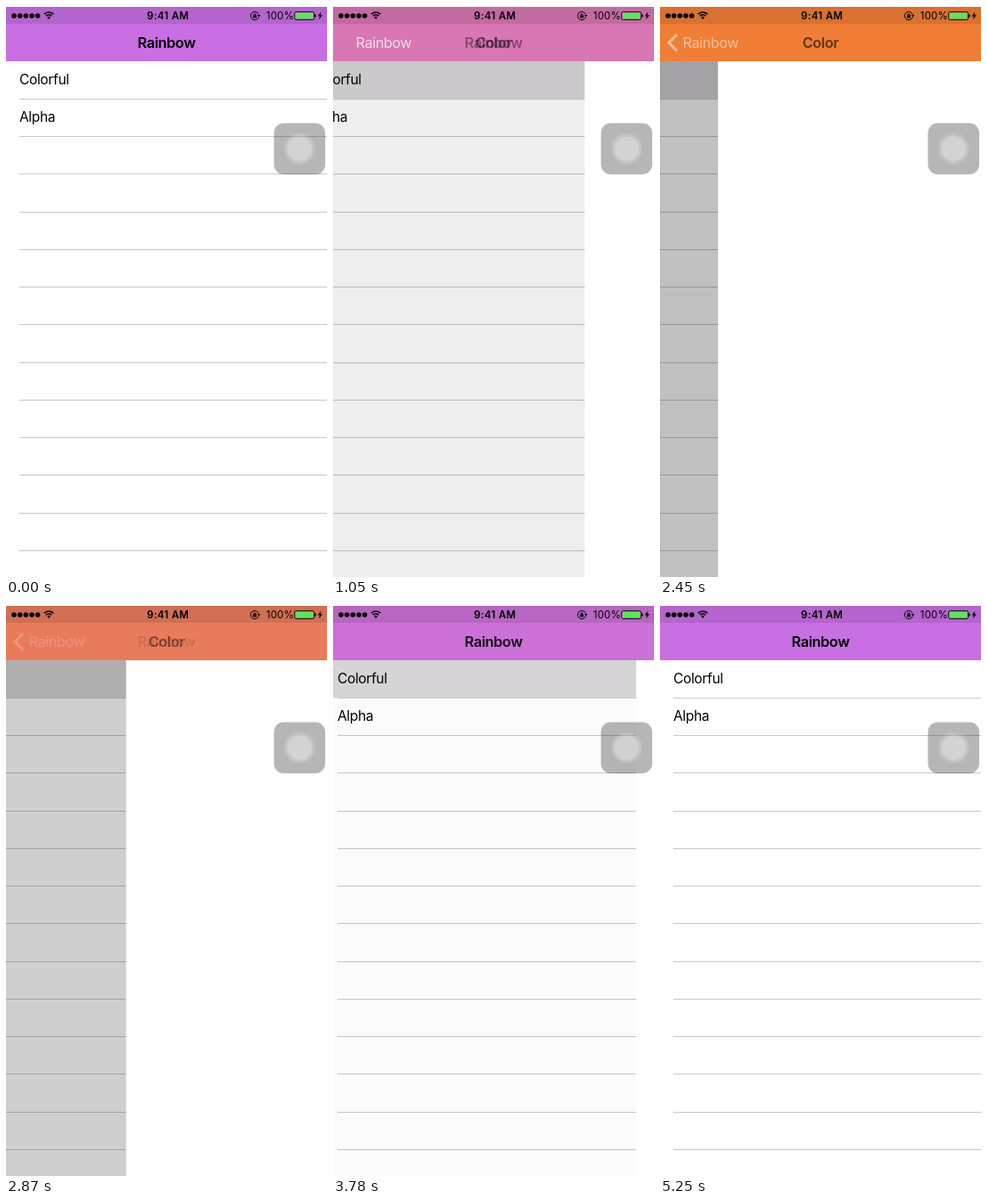
These frames come from a looping animation (360x641 px, 5.32 s). An HTML page with a canvas:

```html
<!DOCTYPE html>
<html lang="en">
<head>
<meta charset="utf-8">
<title>Navigation bar transition</title>
<style>
html, body { margin: 0; width: 100%; height: 100%; overflow: hidden; background: #fff; }
canvas { display: block; width: 360px; height: 641px; }
</style>
</head>
<body>
<canvas id="stage"></canvas>
<script>
const W = 360, H = 641, LOOP = 5320, STEP = 70;
const BAR_TOP = 1, STATUS_END = 20, BAR_END = 62, ROW = 42.24;
const PUSH = 900, PUSH_TIME = 500, DRAG = 2150, RELEASE = 3640, SETTLED = 3900;
const FONT = 'Inter, Roboto, sans-serif';

const canvas = document.getElementById('stage');
const ctx = canvas.getContext('2d');
const dpr = window.devicePixelRatio || 1;
canvas.width = W * dpr;
canvas.height = H * dpr;

const clamp = v => Math.max(0, Math.min(1, v));
const smooth = v => { v = clamp(v); return v * v * (3 - 2 * v); };

// Piecewise linear value through [position, value] pairs.
function track(x, keys) {
  if (x <= keys[0][0]) return keys[0][1];
  for (let i = 1; i < keys.length; i++) {
    const [a, from] = keys[i - 1], [b, to] = keys[i];
    if (x <= b) return from + (to - from) * (x - a) / (b - a);
  }
  return keys[keys.length - 1][1];
}

function barColor(mix) {
  const r = track(mix, [[0, 200], [.27, 217], [.5, 226], [1, 240]]);
  const g = track(mix, [[0, 111], [.27, 118], [1, 126]]);
  const b = track(mix, [[0, 228], [.27, 180], [.5, 139], [1, 52]]);
  return `rgb(${Math.round(r)},${Math.round(g)},${Math.round(b)})`;
}

// Share of the stage the list still occupies: 1 is list only, 0 is detail only.
function listShare(t) {
  if (t < DRAG) return 1 - smooth((t - PUSH) / PUSH_TIME);
  if (t < RELEASE) {
    return track(t, [[DRAG, 0], [2450, 65], [3360, 216], [RELEASE, 266]]) / W;
  }
  const u = clamp((t - RELEASE) / (SETTLED - RELEASE));
  return 1 - (1 - 266 / W) * (1 - u) ** 2;
}

function barState(t, share) {
  if (t < DRAG) {
    return {
      mix: track(t, [[PUSH, 0], [1050, .27], [1400, 1]]),
      home: track(t, [[PUSH, 1], [1050, .38], [1260, 0]]),
      detail: track(t, [[PUSH, 0], [1050, .55], [1330, 1]]),
      back: track(t, [[PUSH, 0], [1050, .75], [1260, 1]]),
      arrow: track(t, [[1050, 0], [1400, 1]])
    };
  }
  const back = track(share, [[0, 1], [.18, .5], [.5, 0]]);
  return {
    mix: track(share, [[0, 1], [.18, .99], [.6, .5], [1, 0]]),
    home: track(share, [[.18, 0], [.6, .25], [1, 1]]),
    detail: track(share, [[0, 1], [.18, .6], [.6, .25], [1, 0]]),
    back,
    arrow: back
  };
}

function rect(x, y, w, h, color) {
  ctx.fillStyle = color;
  ctx.fillRect(x, y, w, h);
}

function disc(x, y, r, color) {
  ctx.fillStyle = color;
  ctx.beginPath();
  ctx.arc(x, y, r, 0, 7);
  ctx.fill();
}

function box(x, y, w, h, r) {
  ctx.beginPath();
  ctx.roundRect(x, y, w, h, r);
}

function line(points, color, width) {
  ctx.strokeStyle = color;
  ctx.lineWidth = width;
  ctx.beginPath();
  points.forEach(([x, y]) => ctx.lineTo(x, y));
  ctx.stroke();
}

function text(str, x, y, size, { weight = 400, color = '#000', align = 'left', gap = -.4, alpha = 1 } = {}) {
  if (alpha <= 0) return;
  ctx.globalAlpha = alpha;
  ctx.font = `${weight} ${size}px ${FONT}`;
  ctx.letterSpacing = gap + 'px';
  ctx.textAlign = align;
  ctx.fillStyle = color;
  ctx.fillText(str, x, y);
  ctx.globalAlpha = 1;
}

function drawList(t, share) {
  const edge = W * share, gone = 1 - share;
  if (edge <= 0) return;
  ctx.save();
  ctx.beginPath();
  ctx.rect(0, BAR_END, edge, H - BAR_END);
  ctx.clip();
  ctx.translate(-W * gone / 2, 0);
  rect(0, BAR_END, W, H, '#fff');
  for (let k = 1; k <= 13; k++) {
    rect(15, Math.round(61.7 + ROW * k), W, 1, '#c8c7ca');
  }
  const lit = t < PUSH ? 0 : 1 - clamp((t - 3990) / 260);
  if (lit) rect(0, BAR_END, W, ROW, `rgba(217,215,217,${lit})`);
  text('Colorful', 15, 88, 15.5, { gap: -.35 });
  text('Alpha', 15, 130.3, 15.5, { gap: -.35 });
  rect(0, BAR_END, W, H, `rgba(0,0,0,${.3 * gone})`);
  ctx.restore();
}

function drawStatus() {
  for (let i = 0; i < 5; i++) disc(9 + 6.65 * i, 11, 2.8, '#000');

  ctx.strokeStyle = '#000';
  ctx.lineWidth = 1.6;
  for (const r of [4.3, 7.2]) {
    ctx.beginPath();
    ctx.arc(48, 14.2, r, -Math.PI * .76, -Math.PI * .24);
    ctx.stroke();
  }
  ctx.fillStyle = '#000';
  ctx.beginPath();
  ctx.moveTo(48, 15);
  ctx.arc(48, 14.4, 2.4, -Math.PI * .78, -Math.PI * .22);
  ctx.fill();

  text('9:41 AM', 181.7, 14.7, 11.5, { weight: 600, align: 'center', gap: .3 });

  // Rotation lock
  ctx.lineWidth = 1;
  ctx.beginPath();
  ctx.arc(279, 11, 4.6, .35, 5.9);
  ctx.stroke();
  rect(277, 10.4, 4, 2.9, '#000');
  ctx.beginPath();
  ctx.arc(279, 10.2, 1.3, Math.PI, 0);
  ctx.stroke();
  ctx.beginPath();
  ctx.moveTo(281.8, 10);
  ctx.lineTo(285.4, 10);
  ctx.lineTo(283.6, 12.4);
  ctx.fill();

  text('100%', 291.8, 14.7, 11.5, { gap: .15 });

  // Battery and charging bolt
  ctx.lineWidth = .9;
  box(323.6, 6.6, 22, 8.8, 1.8);
  ctx.stroke();
  rect(324.7, 7.7, 19.8, 6.6, '#5fe35c');
  box(346.2, 9.3, 1.4, 3.4, .7);
  ctx.fillStyle = '#000';
  ctx.fill();
  ctx.beginPath();
  [[353.4, 6.6], [349.6, 11.4], [351.9, 11.4], [351, 15.2], [355, 10.2], [352.6, 10.2]]
    .forEach(([x, y]) => ctx.lineTo(x, y));
  ctx.fill();
}

function drawBar(bar) {
  rect(0, BAR_TOP, W, BAR_END - BAR_TOP, barColor(bar.mix));
  rect(0, BAR_TOP, W, STATUS_END - BAR_TOP, 'rgba(0,0,0,.1)');
  const title = { weight: 600, align: 'center' };
  text('Rainbow', 180, 47, 16.3, { ...title, alpha: bar.home });
  text('Color', 180, 47, 16.3, { ...title, alpha: bar.detail });
  text('Rainbow', 25.5, 47, 16.2, { color: '#fff', alpha: bar.back });
  ctx.globalAlpha = bar.arrow;
  line([[19, 32], [10, 41.2], [19, 50.4]], '#fff', 3);
  ctx.globalAlpha = 1;
  drawStatus();
}

function drawTouchButton() {
  box(300.5, 131.5, 57.5, 57.5, 11);
  ctx.fillStyle = 'rgba(4,0,4,.285)';
  ctx.fill();
  disc(329.3, 160.2, 18, 'rgba(255,255,255,.1)');
  disc(329.3, 160.2, 15.8, 'rgba(255,255,255,.14)');
  disc(329.3, 160.2, 13.5, 'rgba(255,255,255,.22)');
}

function draw(t) {
  ctx.setTransform(dpr, 0, 0, dpr, 0, 0);
  rect(0, 0, W, H, '#fff');
  const share = listShare(t);
  drawList(t, share);
  drawBar(barState(t, share));
  drawTouchButton();
}

const start = performance.now();
function tick() {
  const t = (performance.now() - start) % LOOP;
  draw(Math.floor(t / STEP) * STEP);
  requestAnimationFrame(tick);
}
tick();
</script>
</body>
</html>
```
